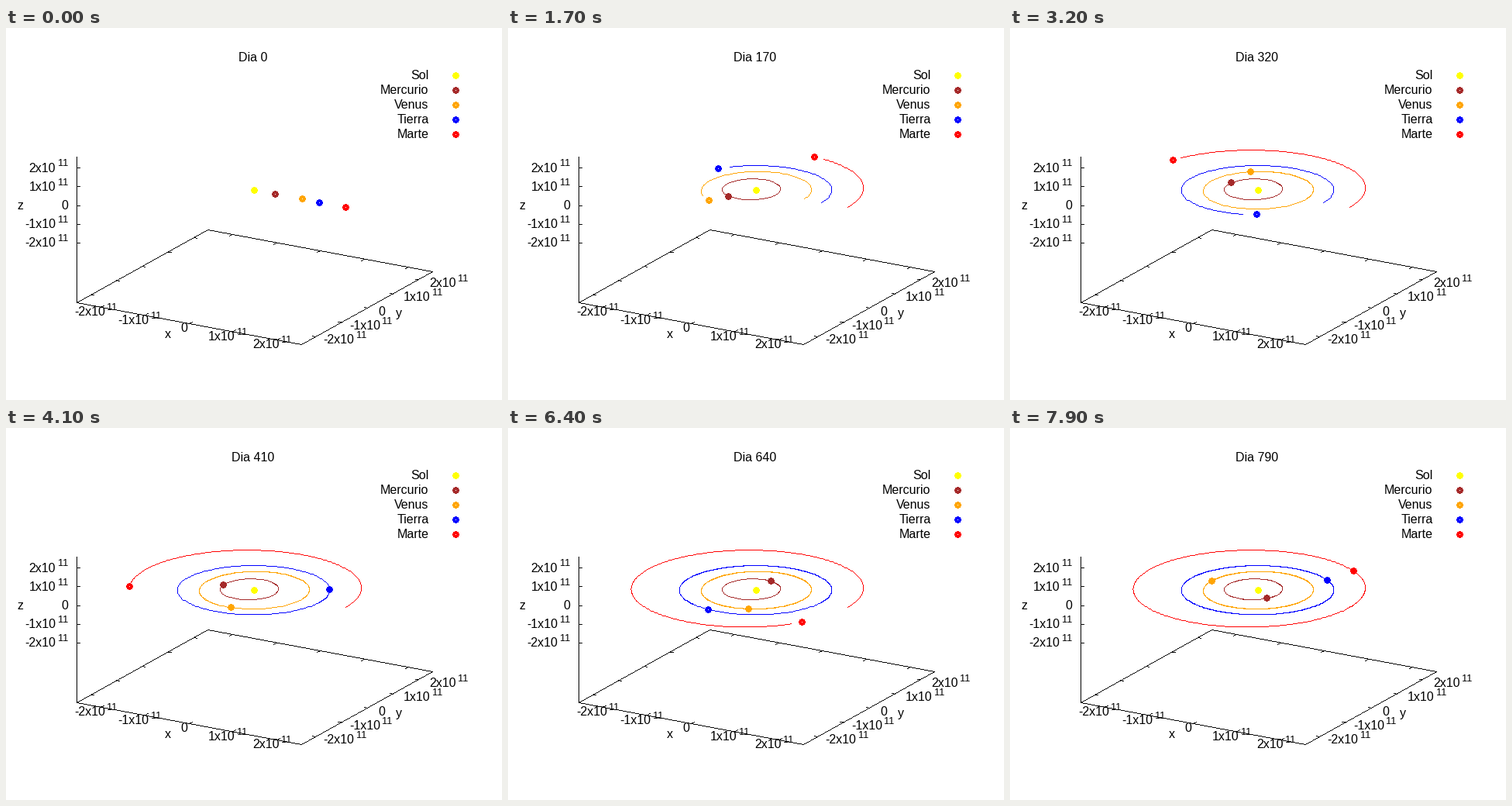
Animation, 640 px wide and 480 px high, one loop 8 s. Source, as a matplotlib script:

```python
import numpy as np
import matplotlib.pyplot as plt
from matplotlib.animation import FuncAnimation

W, H, DPI = 640, 480, 80
PX = 72 / DPI                 # points per pixel
FRAMES, INTERVAL = 80, 100
STEP, DELAY = 10.225, 22.6    # days per frame, days before motion starts
LIMIT = 2.55                  # axis half range, in 1e11 m

# Screen vectors for one unit along each axis
UX = np.array([145, 27]) / LIMIT
UY = np.array([84.5, -46.75]) / LIMIT
UZ = np.array([0, -24.2])
SUN = np.array([320.4, 209])
FLOOR = np.array([320.5, 334])

BLACK, YELLOW = (0, 0, 0), (255, 255, 0)

# name, colour, semi-major axis, eccentricity, inclination (deg), period (days)
PLANETS = [
    ("Mercurio", (165, 42, 42), 0.579, 0.2056, 7.00, 87.97),
    ("Venus", (255, 165, 0), 1.082, 0.0068, 3.39, 224.70),
    ("Tierra", (0, 0, 255), 1.496, 0.0167, 0.00, 365.26),
    ("Marte", (255, 0, 0), 2.2794, 0.0934, 1.85, 686.98),
]

plt.rcParams["font.family"] = "Liberation Sans"
fig = plt.figure(figsize=(W / DPI, H / DPI), dpi=DPI, facecolor="white")
ax = fig.add_axes([0, 0, 1, 1])
ax.axis("off")


def text(x, y, s, size=16, ha="left"):
    return ax.text(x - 1, y, s, fontsize=size * PX, ha=ha, va="baseline")


def polyline(img, points, color):
    """Draw hard one-pixel segments through the points."""
    p = np.round(points).astype(int)
    d = np.diff(p, axis=0)
    n = np.abs(d).max(axis=1)
    seg = np.repeat(np.arange(len(n)), n)
    step = np.arange(n.sum()) - np.repeat(np.cumsum(n) - n, n)
    dots = p[seg] + d[seg] * (step / n[seg])[:, None]
    dots = np.round(np.vstack([dots, p[-1:]])).astype(int)
    img[dots[:, 1], dots[:, 0]] = color


def dot(img, center, color, hole=0.5):
    x, y = np.round(center).astype(int)
    dy, dx = np.mgrid[-5:6, -5:6]
    r = np.hypot(dx, dy)
    img[y - 5:y + 6, x - 5:x + 6][(r >= hole) & (r < 4.3)] = color


def tick_label(x, y, v, align):
    """Label centred vertically on y; align 0, 0.5 or 1 sets the anchor."""
    sign = 5.3 if v < 0 else 0
    width = 50.5 + sign if v else 8.9
    left, base = x - align * width, y + 4.7
    text(left, base, f"{v}x10" if v else "0")
    if v:
        text(left + sign + 37, base - 7, "11", 12.8)


def position(planet, days):
    """Screen points on a Kepler orbit that starts at perihelion."""
    _, _, a, e, incl, period = planet
    m = 2 * np.pi * np.asarray(days, float) / period
    E = m + e * np.sin(m)
    for _ in range(6):
        E = E - (E - e * np.sin(E) - m) / (1 - e * np.cos(E))
    x = a * (np.cos(E) - e)
    y = a * np.sqrt(1 - e * e) * np.sin(E)
    i = np.radians(incl)
    tilted = UY * np.cos(i) + UZ * np.sin(i)
    return SUN + np.multiply.outer(x, UX) + np.multiply.outer(y, tilted)


def draw_axes(img):
    def floor(x, y):
        return FLOOR + x * UX + y * UY

    def tick(p, d):
        polyline(img, [p, p + d], BLACK)

    L = LIMIT
    polyline(img, [floor(-L, -L), floor(L, -L), floor(L, L), floor(-L, L),
                   floor(-L, -L)], BLACK)
    polyline(img, [(91, 354), (91, 166)], BLACK)

    dx = 4 * UX / np.hypot(*UX)
    dy = 4 * UY / np.hypot(*UY)
    for v in range(-2, 3):
        front, back = floor(v, -L), floor(v, L)
        left, right = floor(-L, v), floor(L, v)
        tick(front, dy)
        tick(back, -dy)
        tick(left, dx)
        tick(right, -dx)
        z = np.array([91, 228.7 + v * UZ[1]])
        tick(z, np.array([4, 0]))
        tick_label(front[0] - 6, front[1] + 6.2, v, 0.5)
        tick_label(right[0] + (11 if v < 0 else 15), right[1] + 4.5, v, 0)
        tick_label(80.5, z[1], v, 1)

    text(209, 399.5, "x", ha="center")
    text(507, 373, "y", ha="center")
    text(19, 233.5, "z", ha="center")


def draw_legend(img):
    rows = [("Sol", YELLOW)] + [p[:2] for p in PLANETS]
    for i, (name, color) in enumerate(rows):
        y = 61 + 19 * i
        text(546, y + 4.7, name, ha="right")
        dot(img, (580, y), color, 0.5 if i else 0)


backdrop = np.full((H, W, 3), 255, np.uint8)
draw_axes(backdrop)
draw_legend(backdrop)
title = text(318.7, 42.5, "", ha="center")
picture = ax.imshow(backdrop, interpolation="nearest", aspect="auto")
ax.set_xlim(-0.5, W - 0.5)
ax.set_ylim(H - 0.5, -0.5)


def update(k):
    title.set_text(f"Dia {10 * k}")
    img = backdrop.copy()
    now = max(0, STEP * k - DELAY)
    past = now - STEP
    if past > 0:
        days = np.append(np.arange(0, past, 2.0), past)
        for planet in PLANETS:
            polyline(img, position(planet, days), planet[1])
    dot(img, SUN, YELLOW, hole=0)
    for planet in PLANETS:
        dot(img, position(planet, now), planet[1])
    picture.set_data(img)
    return [picture, title]


anim = FuncAnimation(fig, update, frames=FRAMES, init_func=lambda: update(0),
                     interval=INTERVAL, repeat=True, repeat_delay=0, blit=False)
plt.show()
```
